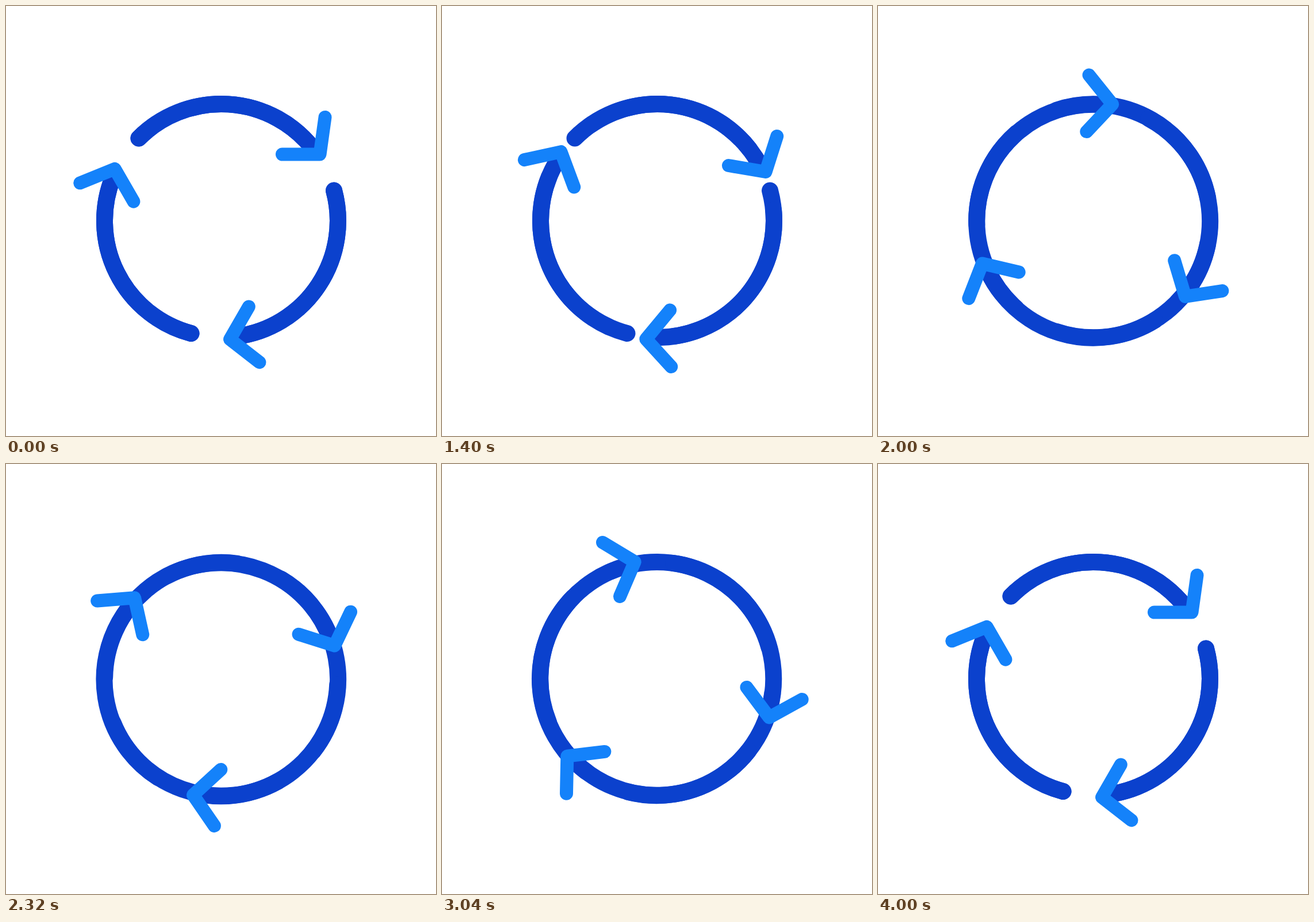
An HTML page that plays this animation: 748x748 px, repeating every 5000 ms.

```html
<!DOCTYPE html>
<html lang="en">
<head>
<meta charset="utf-8">
<title>Cycle arrows</title>
<style>
  html, body { margin: 0; width: 100%; height: 100%; overflow: hidden; background: #fff; }
  svg { display: block; width: 100%; height: 100%; fill: none; stroke-linecap: round; stroke-linejoin: round; }
  .arc { stroke: #0b41cd; stroke-width: 29; }
  .arrow { stroke: #1482fa; stroke-width: 23; }
</style>
</head>
<body>
<svg viewBox="0 0 748 748">
  <defs>
    <path id="arc" d="M231 230A203 203 0 0 1 534.5 248.5"/>
    <path id="arrow" d="M555 193.5 546 258H480.5"/>
    <g id="arcs" class="arc">
      <use href="#arc"/>
      <use href="#arc" transform="rotate(120 374.5 373.5)"/>
      <use href="#arc" transform="rotate(240 374.5 373.5)"/>
    </g>
  </defs>
  <!-- The late set trails the leading one, so together they look like stretching arcs. -->
  <use id="trail" href="#arcs"/>
  <g id="lead">
    <use href="#arcs"/>
    <g class="arrow">
      <use href="#arrow"/>
      <use href="#arrow" transform="rotate(120 374.9 373.7)"/>
      <use href="#arrow" transform="rotate(240 374.9 373.7)"/>
    </g>
  </g>
</svg>
<script>
  const LOOP = 5000, STEP = 40, END = 4000;
  const LEAD_START = 1000, TRAIL_START = 1460;
  const lead = document.getElementById('lead');
  const trail = document.getElementById('trail');

  // Same curve as cubic-bezier(.5, 0, .5, 1)
  function ease(x) {
    if (x <= 0) return 0;
    if (x >= 1) return 1;
    let low = 0, high = 1;
    for (let i = 0; i < 30; i++) {
      const s = (low + high) / 2;
      if (1.5 * s * (1 - s) + s ** 3 < x) low = s;
      else high = s;
    }
    return low * low * (3 - 2 * low);
  }

  function turn(group, time, start) {
    const angle = 360 * ease((time - start) / (END - start));
    group.setAttribute('transform', `rotate(${angle} 374 374)`);
  }

  function draw(now) {
    // 25 pictures a second, with a little tolerance for timer jitter
    const time = Math.floor((now + 4) / STEP) * STEP % LOOP;
    turn(lead, time, LEAD_START);
    turn(trail, time, TRAIL_START);
    requestAnimationFrame(draw);
  }

  requestAnimationFrame(draw);
</script>
</body>
</html>
```
